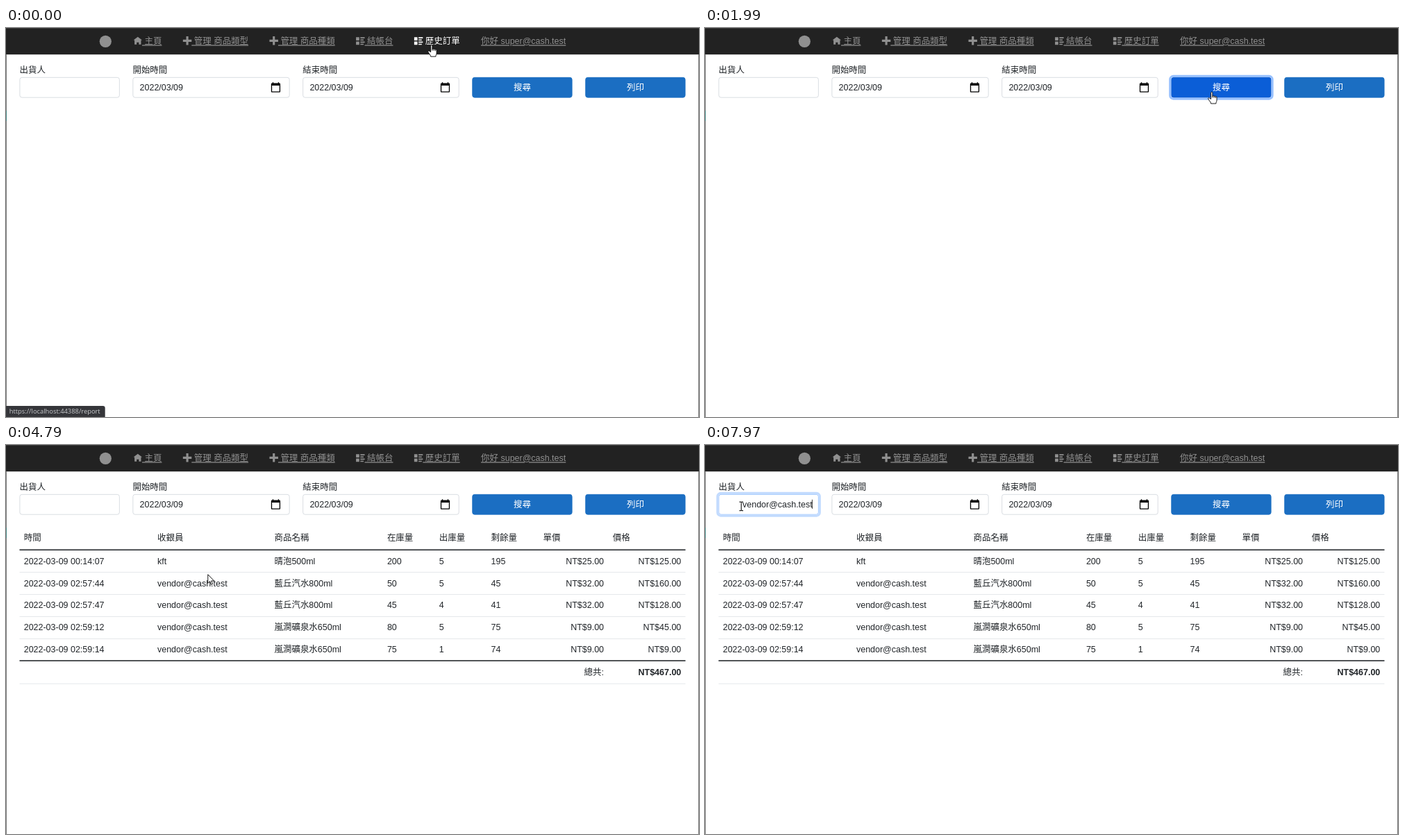
Write an HTML page that moves like this. It is 998x561 px and loops after 8000 ms.

```html
<!DOCTYPE html>
<html lang="zh-Hant">
<head>
<meta charset="utf-8">
<title>歷史訂單</title>
<style>
  html, body { margin: 0; width: 100%; height: 100%; overflow: hidden; background: #fff; }
  svg { display: block; width: 100%; height: 100%; }
  text { font: 300 16px "Liberation Sans", "Noto Sans CJK TC", "Noto Sans CJK", sans-serif; fill: #212529; white-space: pre; }
  .nav, .nav text { fill: #909090; }
  .nav text { text-decoration: underline; text-decoration-thickness: 1px; text-underline-offset: 2px; text-decoration-skip-ink: none; }
  .nav .hover, .nav .hover text { fill: #fff; text-decoration: none; }
  .nav .hover text { font-weight: 500; }
  .field { fill: #fff; stroke: #ced4da; }
  .field.focus { stroke: #86b7fe; }
  .button { fill: #1b6ec2; stroke: #1b6ec2; }
  .button.active { fill: #0b5ed7; stroke: #0a58ca; }
  .ring { fill: none; stroke-width: 4; }
  text.white { fill: #fff; }
  .mid { text-anchor: middle; }
  .end { text-anchor: end; }
  text.medium { font-weight: 500; }
  text.bold { font-weight: bold; }
  text.status { font: 12px "Open Sans", "Noto Sans", sans-serif; fill: #c9cbce; }
  .cursor { fill: #fff; stroke: #000; stroke-width: .9; stroke-linejoin: round; }
  .beam { fill: none; stroke: #222; stroke-width: 1.2; }
</style>
</head>
<body>
<svg viewBox="0 0 1280 719.5" preserveAspectRatio="none">
  <defs>
    <path id="home" transform="translate(0 .5)" d="M4 0l-4 3h1v4h2v-2h2v2h2v-4l1 0z"/>
    <path id="plus" d="M3 0v3h-3v2h3v3h2v-3h3v-2h-3v-3z"/>
    <path id="list" transform="translate(0 .8)" d="M0 0v3h3v-3zM4 0v1h4v-1zM4 2v1h3v-1zM0 4v3h3v-3zM4 4v1h4v-1zM4 6v1h3v-1z"/>
    <path id="calendar" transform="scale(.85)" d="M20 3h-1V1h-2v2H7V1H5v2H4c-1.1 0-2 .9-2 2v16c0 1.1.9 2 2 2h16c1.1 0 2-.9 2-2V5c0-1.1-.9-2-2-2zm0 18H4V8h16z"/>
    <clipPath id="selClip"><rect id="selArea" height="24"/></clipPath>
  </defs>

  <rect width="1280" height="720" fill="#fff"/>
  <rect width="1280" height="49" fill="#222"/>
  <path d="M0 .5H1280" stroke="#454545"/>
  <path d="M.5 49V720M1279.5 49V720" stroke="#3a3a3a"/>
  <path d="M.5 153v19" stroke="#2a8c86"/>
  <g class="nav" id="nav"><circle cx="183.8" cy="24.8" r="11"/></g>

  <g id="form"></g>
  <text id="typed" x="69.3" y="115"></text>
  <path id="caret" stroke="#000"/>

  <g id="table"></g>
  <g id="selection" clip-path="url(#selClip)">
    <rect x="270" y="190" width="150" height="100" fill="#3390ff"/>
  </g>

  <g id="status">
    <path d="M0 699H179a4 4 0 0 1 4 4V720H0z" fill="#35363a"/>
    <text class="status" x="6" y="713.3">https://localhost:44388/report</text>
  </g>

  <g id="cursor">
    <path id="arrow" class="cursor" d="M.4 .4V13l2.9-2.7 2 4.7 2-.9-2-4.5h4z"/>
    <path id="hand" class="cursor" d="M-1.2 10.5V1.4c0-1.5 2.3-1.5 2.3 0v5c.3-1 2.1-.9 2.2.3.4-.8 2-.7 2.1.5.5-.7 1.9-.4 1.9.8v4c0 2-1.2 2.6-1.2 5H-1.2C-1.2 15-3.8 12.8-5 10.3-5.5 9-4 8.2-3 9.2zM1.1 6v2.6M3.3 6.7v2M5.4 7.2v1.8"/>
    <path id="beam" class="beam" d="M-2.8-6h2l.8.7.8-.7h2M0-5.3V5.8M-2.8 6.5h2l.8-.7.8.7h2"/>
  </g>
</svg>
<script>
const $ = id => document.getElementById(id);
const SVG_NS = 'http://www.w3.org/2000/svg';
const LOOP = 8000;
const REFRESH = 139.4;
const CLERK = 'vendor@cash.test';
const GUEST = 'kft';

function add(parent, tag, attrs, content = '') {
  const node = document.createElementNS(SVG_NS, tag);
  for (const key in attrs) node.setAttribute(key, attrs[key]);
  node.textContent = content;
  return parent.appendChild(node);
}
const label = (parent, x, y, content, cls = '') => add(parent, 'text', { x, y, class: cls }, content);
const show = (id, on) => { $(id).style.display = on ? '' : 'none'; };

// Navigation: icons and names flow from left to right.
let navX = 235.4;
function navLink(icon, name) {
  const link = add($('nav'), 'g', {});
  if (icon) {
    add(link, 'use', { href: '#' + icon, transform: `translate(${navX} 15.5) scale(2)` });
    navX += 16;
  }
  navX += label(link, navX, 30, name).getComputedTextLength() + 39;
  return link;
}
navLink('home', ' 主頁');
navLink('plus', ' 管理 商品類型');
navLink('plus', ' 管理 商品種類');
navLink('list', ' 結帳台');
const historyLink = navLink('list', ' 歷史訂單');
navLink('', '你好 super@cash.test');

// Search form
const form = $('form');
const box = (x, width, cls) =>
  add(form, 'rect', { x: x + .5, y: 91.5, width: width - 1, height: 37, rx: 4, class: cls });
const ring = (id, x, width, stroke) =>
  add(form, 'rect', { id, x: x - 2, y: 89, width: width + 4, height: 42, rx: 6, class: 'ring', stroke });

function field(x, width, name) {
  label(form, x, 83.4, name);
  return box(x, width, 'field');
}
function dateField(x, width, name) {
  field(x, width, name);
  label(form, x + 13, 115, '2022/03/09');
  add(form, 'use', { href: '#calendar', x: x + width - 36, y: 99.5 });
}
function button(x, name) {
  const rect = box(x, 185, 'button');
  label(form, x + 92.5, 115, name, 'white mid');
  return rect;
}
const sellerField = field(25, 185, '出貨人');
dateField(234, 290, '開始時間');
dateField(548, 289, '結束時間');
const searchButton = button(861, '搜尋');
button(1070, '列印');
ring('fieldRing', 25, 185, '#c2dbfe');
ring('buttonRing', 861, 185, '#98c1fe');

// Order table
const ROW = 41;
const table = $('table');
const rule = (y, height, fill) => add(table, 'rect', { x: 25, y, width: 1230, height, fill });
const money = amount => `NT$${amount}.00`;

const orders = [
  ['00:14:07', GUEST, '晴泡500ml', 200, 5, 25],
  ['02:57:44', CLERK, '藍丘汽水800ml', 50, 5, 32],
  ['02:57:47', CLERK, '藍丘汽水800ml', 45, 4, 32],
  ['02:59:12', CLERK, '嵐澗礦泉水650ml', 80, 5, 9],
  ['02:59:14', CLERK, '嵐澗礦泉水650ml', 75, 1, 9]
];
const columns = [
  { name: '時間', x: 33, value: o => '2022-03-09 ' + o[0] },
  { name: '收銀員', x: 279.6, value: o => o[1] },
  { name: '商品名稱', x: 495.7, value: o => o[2] },
  { name: '在庫量', x: 704, value: o => o[3] },
  { name: '出庫量', x: 800, value: o => o[4] },
  { name: '剩餘量', x: 896, value: o => o[3] - o[4] },
  { name: '單價', x: 992, right: 1104.3, value: o => money(o[5]) },
  { name: '價格', x: 1120.7, right: 1247, value: o => money(o[4] * o[5]) }
];
for (const { name, x, right, value } of columns) {
  label(table, x, 177.5, name, 'medium');
  orders.forEach((order, r) => label(table, right ?? x, 220 + ROW * r, value(order), right ? 'end' : ''));
}
for (let r = 1; r < orders.length; r++) rule(194 + ROW * r, 1, '#dee2e6');
rule(193, 2, '#212529');
rule(398, 2, '#212529');
rule(441, 1, '#dee2e6');
label(table, 1104.3, 425.8, '總共:', 'end medium');
label(table, 1247, 425.8, money(orders.reduce((sum, o) => sum + o[4] * o[5], 0)), 'end bold');

// Selectable cashier cells
const cells = [GUEST, CLERK].map((name, r) => {
  const text = label($('selection'), 279.6, 220 + ROW * r, name, 'white');
  return { left: 279, top: 203 + ROW * r, right: 279.6 + text.getComputedTextLength() };
});

// Pointer strokes: start, end, x, y. It rests between them.
const strokes = [
  [660, 1700, 936, 118],
  [2250, 2900, 426, 253],
  [2920, 3350, 305, 215],
  [3350, 3630, 241, 217],
  [3750, 3890, 265.5, 215.5],
  [3920, 4180, 324, 214],
  [4500, 4930, 413, 260],
  [4930, 5420, 223, 260],
  [5740, 6020, 115, 117],
  [6260, 6390, 259, 132],
  [6390, 7100, 934, 136],
  [7100, 7930, 67, 113]
];
function pointerAt(t) {
  let [x, y] = [786, 31];
  for (const [from, to, toX, toY] of strokes) {
    const k = Math.min(1, Math.max(0, (t - from) / (to - from)));
    const eased = k * k * (3 - 2 * k);
    x += (toX - x) * eased;
    y += (toY - y) * eased;
  }
  return [x, y];
}

function drawSelection(cell, x) {
  show('selection', cell);
  if (!cell) return;
  const left = Math.min(cell.right, Math.max(cell.left, x));
  $('selArea').setAttribute('x', left);
  $('selArea').setAttribute('y', cell.top);
  $('selArea').setAttribute('width', cell.right - left);
}

function draw(now) {
  // The screen refreshes about seven times a second.
  const t = Math.floor((now % LOOP + 12) / REFRESH) * REFRESH - 12;
  const between = (from, to) => t >= from && t < to;
  const [x, y] = pointerAt(t);
  const inside = (left, top, right, bottom) => x >= left && x <= right && y >= top && y <= bottom;

  const loaded = t >= 2250;
  const searchFocus = between(1930, 3000);
  const fieldFocus = t >= 6100;
  const pasted = t >= 6390;

  const onLink = inside(753, 10, 840, 38);
  const onSearch = inside(861, 91, 1046, 129);
  const onText = inside(25, 91, 210, 129) ||
    loaded && cells.some(c => inside(c.left, c.top, c.right, c.top + 24));
  show('hand', onLink || onSearch);
  show('beam', onText);
  show('arrow', !onLink && !onSearch && !onText);
  $('cursor').setAttribute('transform', `translate(${x} ${y}) scale(1.2826)`);

  historyLink.classList.toggle('hover', onLink);
  searchButton.classList.toggle('active', onSearch || searchFocus);
  sellerField.classList.toggle('focus', fieldFocus);
  show('buttonRing', searchFocus);
  show('fieldRing', fieldFocus);
  show('status', t < 1000);
  show('table', loaded);
  drawSelection(between(3340, 3990) ? cells[0] : between(4880, 6100) ? cells[1] : null, x);

  $('typed').textContent = pasted ? CLERK : '';
  $('caret').setAttribute('d', `M${pasted ? 198 : 38} 101v17`);
  show('caret', fieldFocus && (!pasted || (t - 6390) % 1060 < 530));
}

const start = performance.now();
function loop() {
  draw(performance.now() - start);
  requestAnimationFrame(loop);
}
loop();
</script>
</body>
</html>
```
